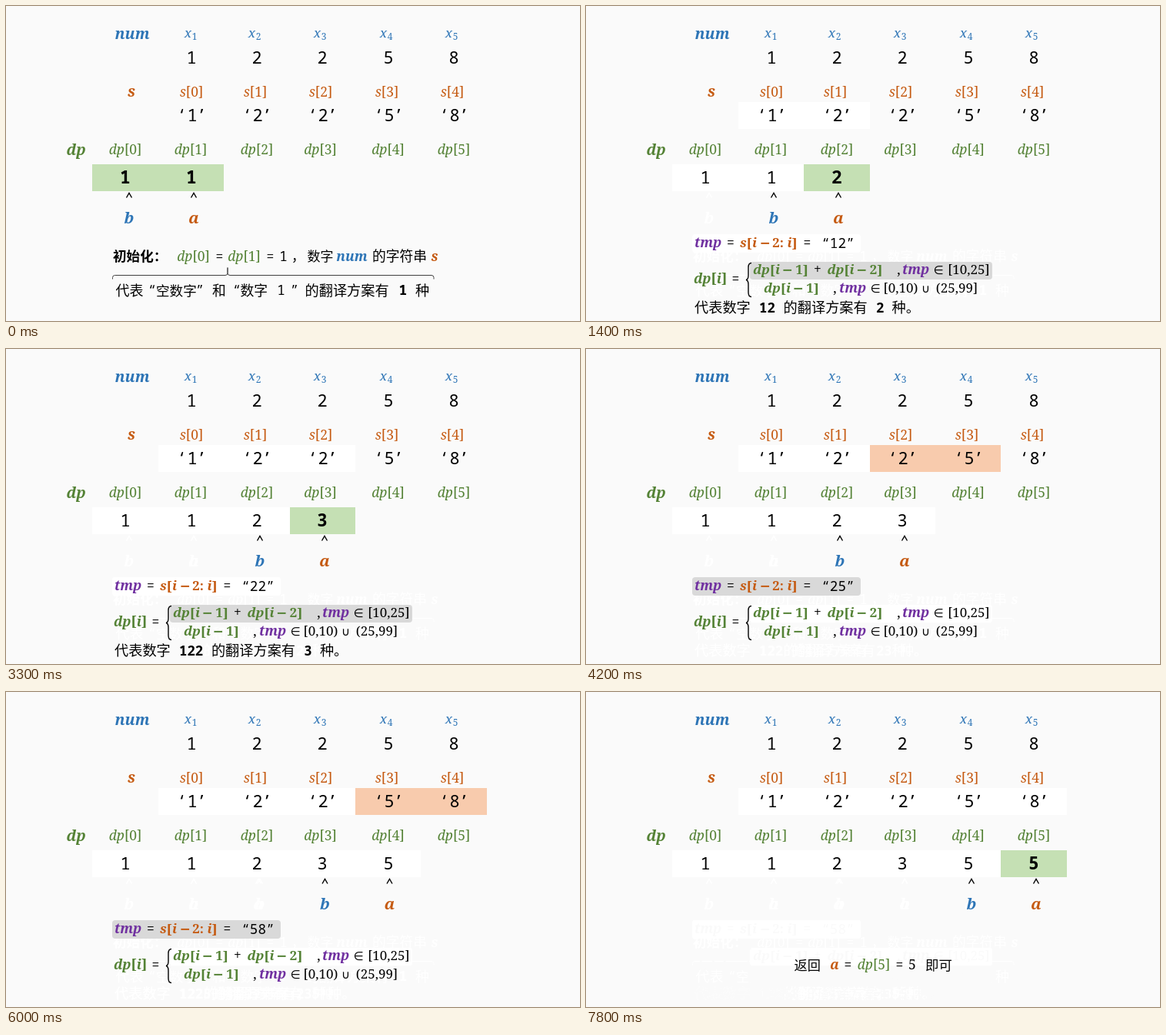
Recreate the animation shown at these times as an HTML page. Size 746x410 px, loop 8000 ms.

```html
<!DOCTYPE html>
<html lang="zh">
<head>
<meta charset="utf-8">
<title>动态规划</title>
<style>
  html, body { margin: 0; width: 100%; height: 100%; overflow: hidden; background: #fafafa; }
  svg { display: block; width: 746px; height: 410px; }
  text { text-anchor: middle; }
  .math { font-family: "Noto Serif", "DejaVu Sans", serif; }
  .mono { font-family: "Noto Sans Mono", "DejaVu Sans Mono", monospace; }
  .han { font-family: "Noto Sans CJK SC", "Noto Sans CJK", sans-serif; }
  .bold { font-weight: 700; }
  .start { text-anchor: start; }
  .it { font-style: italic; }
  .future, .past .live { display: none; }
  .past .trace * { fill: #fff; }
  .past .trace path { fill: none; stroke: #fff; }
  .past .clear * { fill: #fafafa; }
  .past .clear path { fill: none; stroke: #fafafa; }
</style>
</head>
<body>
<svg id="stage" viewBox="0 0 746 410"></svg>
<script>
const BLUE = '#2e75b6', RUST = '#c55a11', GREEN = '#548235', PURPLE = '#7030a0', INK = '#000';
const PEACH = '#f8cbad', LIME = '#c5e0b4', GREY = '#d9d9d9';

const text = (x, y, s, size, fill, cls) =>
  `<text x="${x}" y="${y}" font-size="${size}" fill="${fill}" class="${cls}">${s}</text>`;
const italics = s => String(s).replace(/[a-z]+/g, '<tspan class="it">$&</tspan>');
const math = (x, y, s, fill = INK, size = 17.5, cls = '') =>
  text(x, y, italics(s), size, fill, 'math ' + cls);
const bold = (x, y, s, fill, size = 17.5) => math(x, y, s, fill, size, 'bold');
const mono = (x, y, s, size = 22, cls = '') => text(x, y, s, size, INK, 'mono ' + cls);
const han = (x, y, s, size = 18.2, cls = '') => text(x, y, s, size, INK, 'han start ' + cls);
const rect = (x, y, w, h, fill, r = 0) =>
  `<rect x="${x}" y="${y}" width="${w}" height="${h}" rx="${r}" fill="${fill}"/>`;
const path = (d, w = 1, stroke = INK) =>
  `<path d="${d}" fill="none" stroke="${stroke}" stroke-width="${w}"/>`;

const cellX = i => Math.round(112.3 + 85.4 * i);
const cells = (i, n, y, fill) => rect(cellX(i), y, cellX(i + n) - cellX(i), 35, fill);
const midX = [155, 241, 326, 411, 497, 582];
const dp = [1, 1, 2, 3, 5, 5];
const num = '12258';

function labels() {
  const dpX = [155, 240, 326, 408.5, 496.5, 582];
  let out = bold(164, 43, 'num', BLUE, 19.5) + bold(163, 118, 's', RUST, 19.5) + bold(91, 194, 'dp', GREEN, 19.5);
  [...num].forEach((d, i) => {
    const x = midX[i + 1], lx = [240, 323, 408, 494, 579][i];
    out += math(lx - 3.5, 41, 'x', BLUE, 17) + math(lx + 5, 44, i + 1, BLUE, 12)
      + mono(x, 75, d)
      + math(lx + 1, 118, `s[${i}]`, RUST)
      + mono(x - 12.5, 150, '‘') + mono(x + 1, 150, d) + mono(x + 13.5, 150, '’');
  });
  dpX.forEach((x, i) => out += math(x, 193, `dp[${i}]`, GREEN));
  return out;
}

function values(count, strong) {
  return dp.slice(0, count).map((v, i) => strong.includes(i)
    ? mono(midX[i], 230.5, v, 23, 'bold') : mono(midX[i], 231, v)).join('');
}

function pointers(k) {
  const b = [160, 244, 330, 414.5, 501][k], a = b + 84;
  const caret = x => path(`M${x - 3.5} 249.5L${x} 243.5L${x + 3.5} 249.5`, 1.4);
  return caret(b) + caret(a) + bold(b, 282.5, 'b', BLUE, 20.5) + bold(a, 282.5, 'a', RUST, 20.5);
}

function intro() {
  return han(139, 332, '初始化：', 17.6, 'bold')
    + math(243.5, 332, 'dp[0]', GREEN) + math(277.5, 332, '=') + math(309.5, 332, 'dp[1]', GREEN)
    + math(343.5, 332, '=') + mono(360.5, 332, '1', 17.5) + han(371, 332, '，', 17)
    + han(391.5, 332, '数字', 17) + bold(449.5, 332, 'num', BLUE) + han(476, 332, '的字符串', 17.8)
    + bold(557, 332, 's', RUST)
    + path('M138.5 355.5v-2q0-3 3-3H285q3 0 3-3v-7v7q0 3 3 3H553q3 0 3 3v2', 1, '#404040')
    + han(142.5, 376.5, '代表', 18) + mono(190, 376, '“', 17.5) + han(195, 376.5, '空数字', 17.6)
    + mono(252, 376, '”', 17.5) + han(268, 376.5, '和', 17.8) + mono(300, 376, '“', 17.5)
    + han(304.5, 376.5, '数字', 17.8) + mono(357.5, 376, '1', 17.5) + mono(375, 376, '”', 17.5)
    + han(388.5, 376.5, '的翻译方案有') + mono(516, 376, '1', 18, 'bold') + han(532, 376.5, '种');
}

const term = (x, y, n) => bold(x + 19, y, 'dp[i', GREEN, 17) + bold(x + 46, y, '−', GREEN, 17)
  + bold(x + 65, y, n + ']', GREEN, 17);

function formula(pair) {
  return bold(158.5, 314, 'tmp', PURPLE) + math(188, 314, '=')
    + bold(211, 314, 's[i', RUST, 17) + bold(232.5, 314, '−', RUST, 17)
    + bold(249.5, 314, '2:', RUST, 17) + bold(268, 314, 'i]', RUST, 17)
    + math(287.5, 314, '=') + mono(327.5, 315, `“${pair}”`, 17.8)
    + bold(161.5, 361, 'dp[i]', GREEN) + math(194.5, 361, '=')
    + path('M215 334.5q-4 0-4 6v10q0 5.500-3 6q3 .5 3 6v10q0 6 4 6', 1.4)
    + term(215.5, 349, 1) + math(301, 349, '+') + term(312, 349, 2)
    + math(406.5, 349, ',') + bold(428.5, 349, 'tmp', PURPLE) + math(458, 349, '∈', INK, 15)
    + math(497.5, 349, '[10,25]', INK, 17)
    + term(229.5, 373, 1) + math(323.5, 373, ',') + bold(346.5, 373, 'tmp', PURPLE)
    + math(376, 373, '∈', INK, 15) + math(409, 373, '[0,10)', INK, 17)
    + math(441.5, 373, '∪', INK, 15) + math(482, 373, '(25,99]', INK, 17);
}

function summary(digits, count) {
  const x = 236 + 10.3 * digits.length;
  return han(141, 399, '代表数字') + mono(225, 399, digits, 17.4, 'bold start')
    + han(x, 399, '的翻译方案有') + mono(x + 125.5, 399, count, 17.4, 'bold')
    + han(x + 141, 399, '种。');
}

const result = han(270.5, 361.5, '返回', 17.2) + bold(323, 361, 'a', RUST) + math(340.5, 361, '=')
  + math(374, 361, 'dp[5]', GREEN) + math(407.5, 361, '=') + math(424, 361, '5') + han(441, 361.5, '即可', 17.4);

// trace: turns pale once its scene is over; live: vanishes
const scenes = [{ at: 0, trace: cells(0, 2, 206, LIME) + intro(), live: values(2, [0, 1]) + pointers(0) }];
[[500, 1400], [2400, 3300], [4200, 5100], [6000, 6900]].forEach(([look, add], k) => {
  const pair = num.slice(k, k + 2), last = k === 3;
  const green = cells(k + 2, 1, 206, LIME), lines = formula(pair);
  scenes.push({
    at: look,
    trace: cells(k + 1, 2, 125, PEACH) + rect(138, 297, 219, 24, GREY, 4) + pointers(k),
    live: lines + values(k + 2, [])
  });
  scenes.push({
    at: add,
    clear: last,
    trace: (last ? '' : green) + rect(213, last ? 356 : 333, 315, 23, GREY, 4)
      + summary(num.slice(0, k + 2), dp[k + 2]) + (last ? lines : ''),
    live: (last ? green : lines) + values(k + 3, [k + 2]) + pointers(k + 1)
  });
});
scenes.push({ at: 7800, trace: '', live: cells(5, 1, 206, LIME) + values(6, [5]) + pointers(4) + result });

const stage = document.getElementById('stage');
stage.innerHTML = scenes.map(s =>
  `<g class="future"><g class="trace${s.clear ? ' clear' : ''}">${s.trace}</g><g class="live">${s.live}</g></g>`
).join('') + labels();
const groups = [...stage.children].slice(0, scenes.length);

let shown = -1;
function draw(now) {
  const t = now % 8000;
  const current = scenes.filter(s => s.at <= t).length - 1;
  if (current !== shown) {
    shown = current;
    groups.forEach((g, i) => g.setAttribute('class', i < current ? 'past' : i > current ? 'future' : 'now'));
  }
  requestAnimationFrame(draw);
}
draw(performance.now());
</script>
</body>
</html>
```
